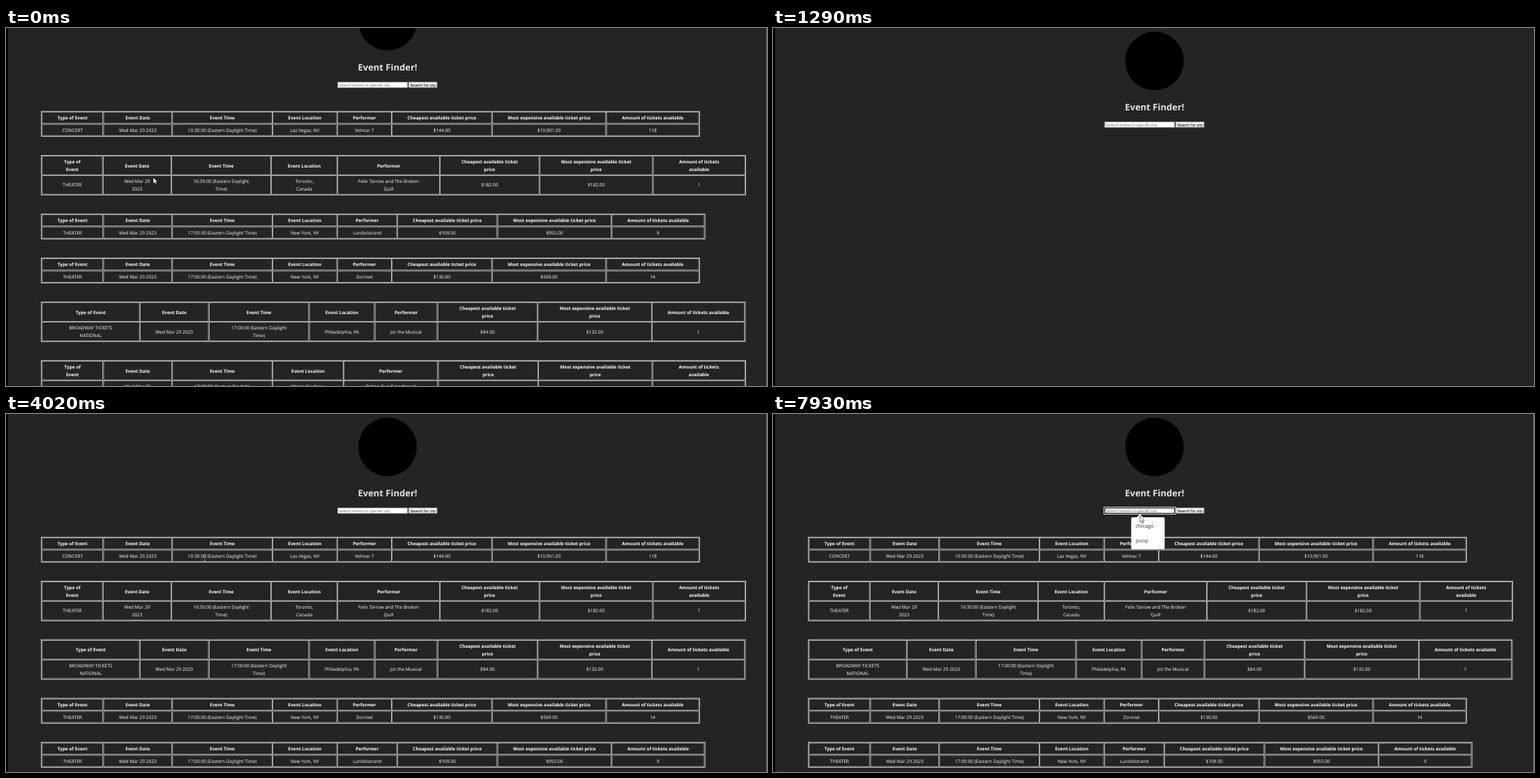
An HTML page with a canvas for the animation above (8000 ms loop, 1091 by 513 pixels).

```html
<!DOCTYPE html>
<html lang="en">
<head>
<meta charset="utf-8">
<title>Event Finder</title>
<style>
  html, body { margin: 0; width: 100%; height: 100%; overflow: hidden; background: #242424; }
  canvas { display: block; }
</style>
</head>
<body>
<canvas id="stage" width="1091" height="513"></canvas>
<script>
const ctx = document.getElementById('stage').getContext('2d');
ctx.textRendering = 'geometricPrecision';

const LOOP = 8000, RELOAD = 1290;
const BG = '#242424', INK = '#e3e3e3', WHITE = '#fff';
const SANS = '"Open Sans", "Noto Sans", sans-serif';
const ARIAL = '"Liberation Sans", Arial, sans-serif';
const CELL = `6.6px ${SANS}`, HEAD = `bold 6.45px ${SANS}`;
const LINE = 10.39, ROW = 17.5, GAP = 28.1, BORDER = 0.7, INSET = 0.65;
const LEFT = 51.2, MAX_WIDTH = 1008.8, PADDING = 45.1;

const DATE = 'Wed Mar 29 2023', DATE_2 = 'Wed Mar 29|2023';
const EVENING = '17:00:00 (Eastern Daylight Time)', EVENING_2 = '17:00:00 (Eastern Daylight|Time)';
const TITLES = ['Type of Event', 'Event Date', 'Event Time', 'Event Location', 'Performer',
  'Cheapest available ticket price', 'Most expensive available ticket price', 'Amount of tickets available'];
const WRAP_PRICES = { 5: 'Cheapest available ticket|price', 6: 'Most expensive available ticket|price' };
const WRAP_ALL = { ...WRAP_PRICES, 0: 'Type of|Event', 7: 'Amount of tickets|available' };

function textWidth(str, font) {
  ctx.font = font;
  return ctx.measureText(str.replace('|', ' ')).width;
}

// Columns fit their unbroken text, then shrink together to the page width. "|" breaks a line.
function table(cells, wraps) {
  const titles = TITLES.map((title, i) => wraps?.[i] ?? title);
  const widths = cells.map((cell, i) =>
    Math.max(textWidth(cell, CELL), textWidth(titles[i], HEAD)) + PADDING);
  const shrink = Math.min(1, MAX_WIDTH / widths.reduce((a, b) => a + b));
  const edges = [LEFT];
  widths.forEach((w, i) => edges.push(edges[i] + w * shrink));
  const row = ROW + (wraps ? LINE : 0);
  return { titles, cells, edges, row };
}

const concert = table(['CONCERT', DATE, '10:30:00 (Eastern Daylight Time)', 'Las Vegas, NV',
  'Velmar 7', '$144.00', '$10,901.00', '118']);
const toronto = table(['THEATER', DATE_2, '16:30:00 (Eastern Daylight|Time)', 'Toronto,|Canada',
  'Felix Tarrow and The Broken|Quill', '$182.00', '$182.00', '1'], WRAP_ALL);
const drama = table(['THEATER', DATE, EVENING, 'New York, NY', 'Lundolstrand', '$109.00', '$955.00', '9']);
const fantasy = table(['THEATER', DATE, EVENING, 'New York, NY', 'Zorimel', '$130.00', '$569.00', '14']);
const musical = table(['BROADWAY TICKETS|NATIONAL', DATE, EVENING_2, 'Philadelphia, PA',
  'Jot the Musical', '$84.00', '$132.00', '1'], WRAP_PRICES);
const tennis = table(['TENNIS', DATE_2, EVENING_2, 'Miami Gardens,|FL',
  'Palmo Cup Grandstand|Day 1', '$60.00', '$95.00', '2'], WRAP_ALL);

const BEFORE = [concert, toronto, drama, fantasy, musical, tennis];
const AFTER = [concert, toronto, musical, fantasy, drama, tennis];

// Pointer stops: time, x, y.
const POINTER = [[0, 211, 214], [280, 194.5, 168], [560, 100, -20], [1425, 393.5, 257],
  [2240, 165, 207], [2780, 71.5, 206], [3340, 82, 206], [4410, 411, 206], [4948, 521, 203.5],
  [6710, 930, 206], [7387, 510, 138.5], [7800, 496, 138.5], [7929, 526, 146]];

// The screen updates in even steps, resting between the scroll and the reload.
function snap(t) {
  if (t < RELOAD) return 140 * Math.min(4, Math.floor(t / 140));
  return RELOAD + 135.5 * Math.floor((t - RELOAD) / 135.5);
}

function pointerAt(t) {
  const next = POINTER.findIndex(stop => stop[0] > t);
  if (next < 0) return POINTER.at(-1).slice(1);
  const [t0, x0, y0] = POINTER[next - 1], [t1, x1, y1] = POINTER[next];
  const k = (t - t0) / (t1 - t0);
  return [x0 + (x1 - x0) * k, y0 + (y1 - y0) * k];
}

function box(x, y, w, h, color) {
  ctx.fillStyle = color;
  ctx.fillRect(x, y, w, h);
}

function text(str, x, y, font, color, align = 'center') {
  ctx.font = font;
  ctx.textAlign = align;
  ctx.fillStyle = color;
  ctx.fillText(str, x, y);
}

function lines(str, x, y, font) {
  const parts = str.split('|');
  parts.forEach((part, i) =>
    text(part, x, y + 2.6 + (i - (parts.length - 1) / 2) * LINE, font, WHITE));
}

function frame(x, y, w, h, inset) {
  ctx.strokeStyle = INK;
  ctx.lineWidth = BORDER;
  ctx.strokeRect(x + inset, y + inset, w - 2 * inset, h - 2 * inset);
}

function drawTable({ edges, cells, titles, row }, top, selectedFrom) {
  frame(LEFT, top, edges.at(-1) - LEFT, 2 * row, -INSET);
  cells.forEach((cell, i) => {
    const width = edges[i + 1] - edges[i], mid = edges[i] + width / 2;
    frame(edges[i], top, width, row, INSET);
    frame(edges[i], top + row, width, row, INSET);
    lines(titles[i], mid, top + row / 2, HEAD);
    const y = top + row * 1.5;
    if (i >= selectedFrom) {
      const w = textWidth(cell, CELL), space = i < cells.length - 1 ? 2 : 0;
      box(mid - w / 2, y - LINE / 2, w + space, LINE, '#0a64d6');
    }
    lines(cell, mid, y, CELL);
  });
}

function drawHeader(y, focused) {
  ctx.fillStyle = '#000';
  ctx.beginPath();
  ctx.arc(547, y + 47.3, 42, 0, 7);
  ctx.fill();
  text('Event Finder!', 547, y + 118.2, `bold 13px ${SANS}`, INK);

  if (focused) {
    box(474, y + 133, 103.3, 11, WHITE);
    box(474.9, y + 133.9, 101.5, 9.2, '#101010');
    box(476.2, y + 135.2, 98.9, 6.6, WHITE);
  } else {
    box(475, y + 134, 101.3, 9, '#767676');
    box(475.9, y + 134.9, 99.5, 7.2, WHITE);
  }
  text('Search events in specific city', 476.7, y + 140.5, `5.77px ${ARIAL}`, '#757575', 'left');
  box(576.8, y + 134, 41.6, 8.8, '#767676');
  box(577.6, y + 134.8, 40, 7.2, '#efefef');
  text('Search for city', 597.6, y + 140.5, `5.77px ${ARIAL}`, '#000');
}

function drawSuggestions() {
  ctx.fillStyle = WHITE;
  ctx.beginPath();
  ctx.roundRect(513.5, 148, 48, 46, 2);
  ctx.moveTo(521, 148.5);
  ctx.lineTo(526, 143.5);
  ctx.lineTo(531, 148.5);
  ctx.fill();
  ['chicago', 'poop'].forEach((word, i) =>
    text(word, 520, 163 + i * 20.6, `7.4px ${SANS}`, '#333', 'left'));
}

// The pointer becomes a text beam over the first data row's words and the input.
function overText(x, y) {
  if (x > 476 && x < 575 && y > 134 && y < 143) return true;
  if (y < 198 || y > 209) return false;
  return concert.cells.some((cell, i) => {
    const mid = (concert.edges[i] + concert.edges[i + 1]) / 2;
    return Math.abs(x - mid) < textWidth(cell, CELL) / 2;
  });
}

function drawPointer(x, y) {
  if (overText(x, y)) {
    box(x - 0.4, y - 4.5, 0.9, 9, '#9a9a9a');
    for (const end of [-4.8, 4.1]) box(x - 1.7, y + end, 3.4, 0.7, '#9a9a9a');
    return;
  }
  const shape = [[0, 0], [0, 9.2], [2.1, 7.3], [3.5, 10.5], [5, 9.9], [3.6, 6.8], [6.4, 6.6]];
  ctx.beginPath();
  shape.forEach(([dx, dy]) => ctx.lineTo(x + dx, y + dy));
  ctx.closePath();
  ctx.fillStyle = WHITE;
  ctx.fill();
  ctx.strokeStyle = '#000';
  ctx.lineWidth = 0.6;
  ctx.stroke();
}

function draw(now) {
  const t = snap(now % LOOP);
  const scroll = -57 * Math.max(0, 1 - t / 570) ** 3;
  const loading = t === RELOAD;
  const selecting = t > 4760 && t < 5300;
  const focused = t > 7450;

  box(0, 0, 1091, 513, BG);
  box(0, 0, 3, 513, '#000');
  drawHeader(scroll, focused);
  if (!loading) {
    box(1090, 0, 1, 513, '#777');
    let top = 176.9 + scroll;
    (t < RELOAD ? BEFORE : AFTER).forEach((item, i) => {
      drawTable(item, top, i === 0 && selecting ? 3 : Infinity);
      top += 2 * item.row + GAP;
    });
  }
  if (focused) drawSuggestions();
  if (t < 560 || t > RELOAD) drawPointer(...pointerAt(t));
}

const begin = performance.now();
function tick() {
  draw(performance.now() - begin);
  requestAnimationFrame(tick);
}
tick();
</script>
</body>
</html>
```
